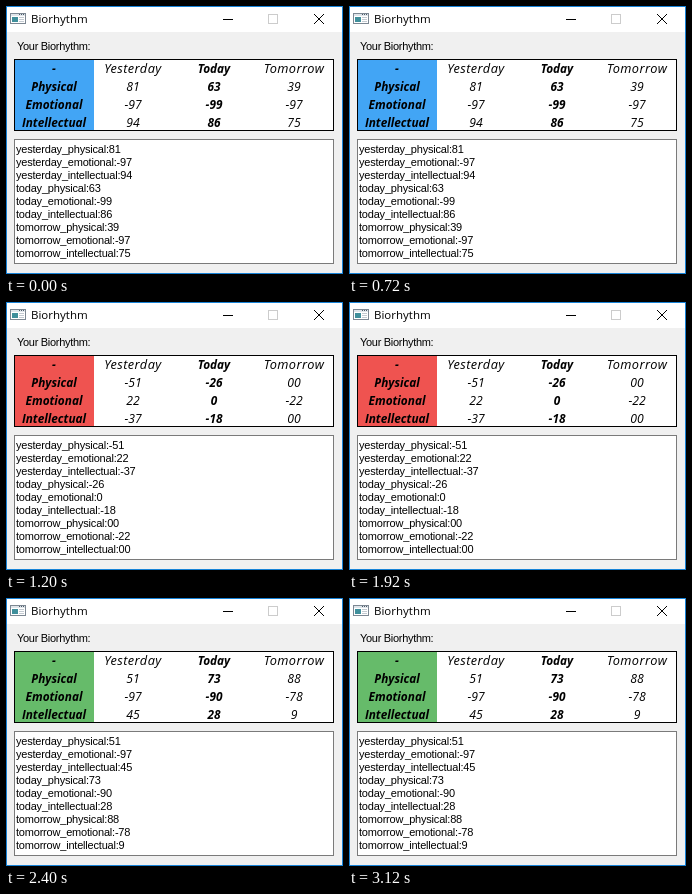
Animation of 337x268 px, one loop 3600 ms. Source, as an HTML page:

```html
<!DOCTYPE html>
<html lang="en">
<head>
<meta charset="utf-8">
<title>Biorhythm</title>
<style>
  html, body { margin: 0; width: 100%; height: 100%; overflow: hidden; background: #f0f0f0; }
  svg { display: block; }
  text { white-space: pre; }
  .title { font: 11.5px "Open Sans", sans-serif; }
  .ui { font: 11px "Liberation Sans", Arial, sans-serif; letter-spacing: -.3px; }
  .log { letter-spacing: -.2px; }
  .cell { font: italic 12.2px "Open Sans", sans-serif; text-anchor: middle; }
  .head { font-size: 12.8px; letter-spacing: .45px; }
  .bold { font-size: 11.8px; font-weight: 700; letter-spacing: 0; }
  .page { opacity: 0; animation: show 3.6s step-end infinite; }
  @keyframes show {
    0% { opacity: 1; }
    33.3333%, 100% { opacity: 0; }
  }
</style>
</head>
<body>
<svg width="337" height="268" viewBox="0 0 337 268">
  <rect width="337" height="268" fill="#f0f0f0"/>
  <rect width="337" height="26" fill="#fff"/>
  <rect x=".5" y=".5" width="336" height="267" fill="none" stroke="#1883d7"/>

  <g shape-rendering="crispEdges">
    <rect x="4.5" y="7.5" width="15" height="10" fill="#fff" stroke="#7c8792"/>
    <rect x="5" y="8" width="14" height="2" fill="#dfe5ea"/>
    <path d="M13 8.5h1M15 8.5h1M17 8.5h1" stroke="#4c5a68"/>
    <rect x="6" y="11" width="6" height="5" fill="#3f8f9b"/>
    <path d="M13 11.5h5M13 13.5h5M13 15.5h5" stroke="#c3cad1"/>
    <path d="M217 13.5h10" stroke="#000"/>
    <rect x="262.5" y="8.5" width="9" height="9" fill="none" stroke="#ccc"/>
  </g>
  <path d="M308 8l10 10m0-10l-10 10" stroke="#000"/>
  <text class="title" x="25" y="17">Biorhythm</text>
  <text class="ui" x="11" y="44">Your Biorhythm:</text>

  <rect x="8.5" y="53.5" width="319" height="71" fill="#fff" stroke="#000"/>
  <rect x="8.5" y="133.5" width="319" height="124" fill="#fff" stroke="#7a7a7a"/>
  <g id="pages"></g>
  <g id="labels"></g>
</svg>
<script>
  const NS = "http://www.w3.org/2000/svg";
  const days = ["Yesterday", "Today", "Tomorrow"];
  const cycles = ["Physical", "Emotional", "Intellectual"];
  const colX = [127, 208, 288];
  const rowY = i => 67 + 18 * i;

  // Values per day: physical, emotional, intellectual
  const readings = [
    { color: "#42a5f5", values: ["81 -97 94", "63 -99 86", "39 -97 75"] },
    { color: "#ef5350", values: ["-51 22 -37", "-26 0 -18", "00 -22 00"] },
    { color: "#66bb6a", values: ["51 -97 45", "73 -90 28", "88 -78 9"] }
  ];

  function add(parent, tag, attrs, content = "") {
    const el = document.createElementNS(NS, tag);
    for (const k in attrs) el.setAttribute(k, attrs[k]);
    el.textContent = content;
    parent.appendChild(el);
    return el;
  }

  const pages = document.getElementById("pages");
  const labels = document.getElementById("labels");

  ["-", ...cycles].forEach((name, i) =>
    add(labels, "text", { class: "cell bold", x: 48, y: rowY(i) }, name));
  days.forEach((day, d) =>
    add(labels, "text", { class: d === 1 ? "cell head bold" : "cell head", x: colX[d], y: rowY(0) }, day));

  readings.forEach(({ color, values }, i) => {
    const page = add(pages, "g", { class: "page", style: `animation-delay:${(i - 3) * 1.2}s` });
    add(page, "rect", { x: 9, y: 54, width: 79, height: 70, fill: color });
    values.forEach((list, d) => list.split(" ").forEach((value, c) => {
      add(page, "text", { class: d === 1 ? "cell bold" : "cell", x: colX[d], y: rowY(c + 1) }, value);
      const line = `${days[d]}_${cycles[c]}:${value}`.toLowerCase();
      add(page, "text", { class: "ui log", x: 10, y: 147 + 13 * (3 * d + c) }, line);
    }));
  });
</script>
</body>
</html>
```
